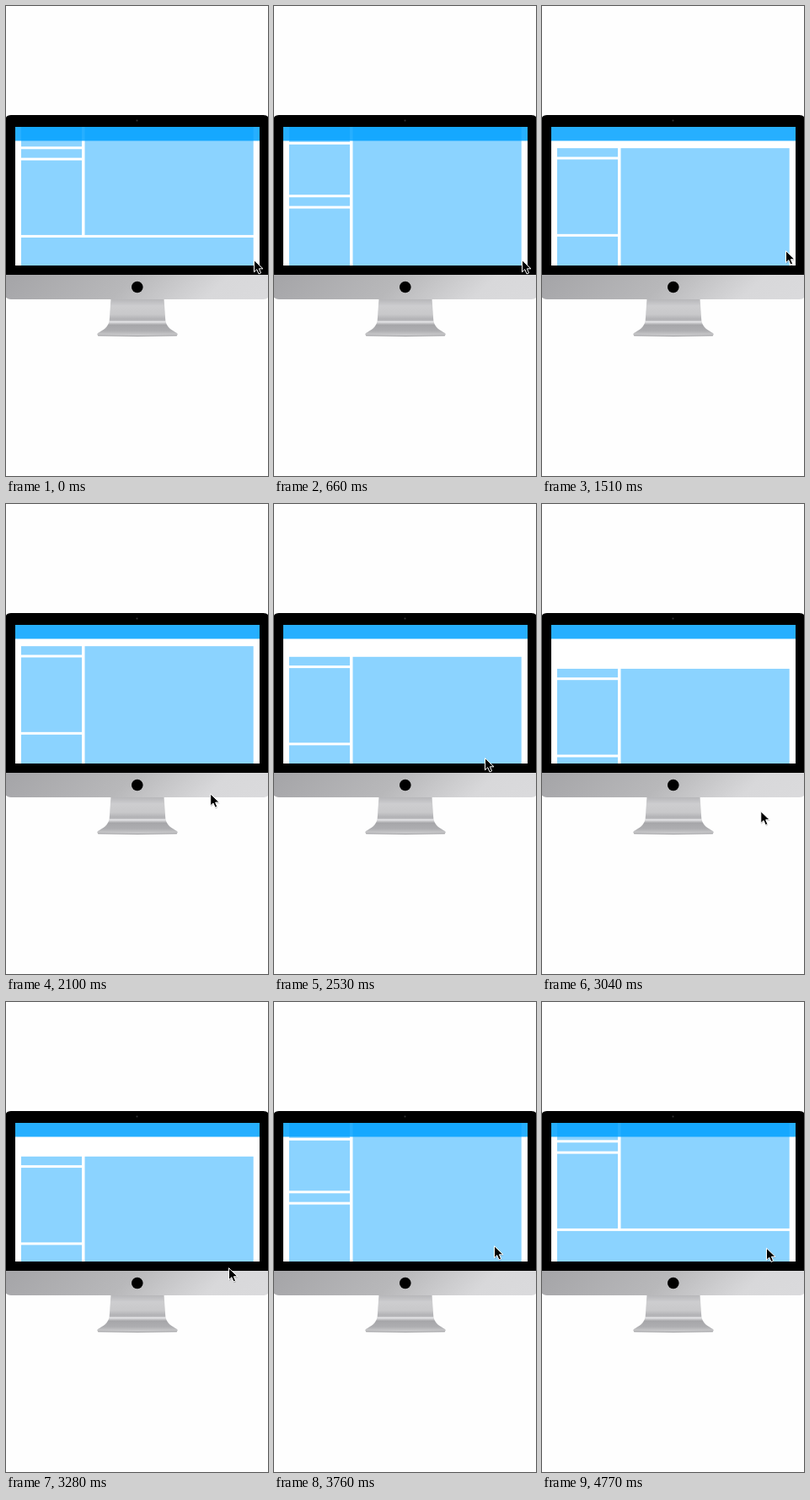
Write an HTML page that moves like this. It is 311 px wide and 556 px high and loops after 4870 ms.

```html
<!DOCTYPE html>
<html lang="en">
<head>
<meta charset="utf-8">
<title>Scrolling page</title>
<style>
  html, body { margin: 0; width: 100%; height: 100%; overflow: hidden; background: #fefefe; }
  svg { display: block; width: 100%; height: 100%; }
</style>
</head>
<body>
<svg viewBox="0 0 311 556">
  <defs>
    <linearGradient id="chin" x1="0" y1=".45" x2="1" y2=".55">
      <stop offset="0" stop-color="#a6a6a9"/>
      <stop offset=".45" stop-color="#b8b8ba"/>
      <stop offset=".8" stop-color="#d8d8da"/>
      <stop offset="1" stop-color="#dadadc"/>
    </linearGradient>
    <linearGradient id="neck" x1="0" y1="0" x2="0" y2="1">
      <stop offset="0" stop-color="#b4b4b7"/>
      <stop offset=".3" stop-color="#cdcdcf"/>
      <stop offset=".65" stop-color="#c8c8ca"/>
      <stop offset=".86" stop-color="#b0b0b3"/>
      <stop offset="1" stop-color="#e6e6e8"/>
    </linearGradient>
    <linearGradient id="foot" x1="0" y1="0" x2="0" y2="1">
      <stop offset="0" stop-color="#ececee"/>
      <stop offset=".25" stop-color="#a6a6a9"/>
      <stop offset=".65" stop-color="#aeaeb1"/>
      <stop offset="1" stop-color="#cfcfd1"/>
    </linearGradient>
    <clipPath id="screen"><rect x="11" y="143" width="290" height="164"/></clipPath>
  </defs>

  <path d="M124.5 346H187.5L189.5 375H122.5Z" fill="url(#neck)"/>
  <path d="M122.5 373H189.5C191 380 196 383 203 387Q205 389 202 390.300H110Q107 389 109 387C116 383 121 380 122.500 373Z" fill="url(#foot)"/>
  <path d="M109 389.800Q156 391.200 203 389.800" fill="none" stroke="#98989a" stroke-width=".9"/>

  <path d="M-1 318V136Q-1 129 6 129H305.500Q312.500 129 312.500 136V318Z" fill="#000"/>
  <path d="M-1 318H312.500V340Q312.500 347 305.500 347H6Q-1 347 -1 340Z" fill="url(#chin)"/>
  <circle cx="155.500" cy="135.500" r="1" fill="#343438"/>
  <circle cx="155.800" cy="332.500" r="6.800" fill="#000"/>

  <g clip-path="url(#screen)">
    <rect x="11" y="143" width="290" height="164" fill="#fff"/>
    <g id="page" fill="#8bd3ff"></g>
    <rect x="11" y="143" width="290" height="16.500" fill="#00a2ff" fill-opacity=".85"/>
  </g>

  <g id="cursor">
    <path d="M1 2V16L4.300 13L6.500 18.200L9 17.200L6.800 12.200H11.600Z" fill="#000" opacity=".22"/>
    <path d="M.5 .7V14.700L3.800 11.700L6 16.900L8.600 15.800L6.400 10.800H11Z"
      fill="#000" stroke="#fff" stroke-width="1" stroke-linejoin="round"/>
  </g>
</svg>
<script>
const LOOP = 4870, TOP = 168.2, GAP = 3;
const page = document.getElementById('page');
const cursor = document.getElementById('cursor');

function addBlock(x, y, width, height) {
  const block = document.createElementNS('http://www.w3.org/2000/svg', 'rect');
  Object.entries({ x, y, width, height }).forEach(([k, v]) => block.setAttribute(k, v));
  page.append(block);
}

// Stacked sidebar, main column of the same height, footer
const SMALL = 10.3, LARGE = 88.3, MIDDLE = 59.5;
let bottom = TOP;
for (const height of [SMALL, LARGE, MIDDLE, SMALL, LARGE]) {
  addBlock(18, bottom, 72, height);
  bottom += height + GAP;
}
addBlock(93.5, TOP, 200.2, bottom - GAP - TOP);
addBlock(18, bottom, 275.7, 120);

const easeOut = u => 1 - (1 - u) ** 2;
const smooth = u => u * u * (3 - 2 * u);

// Each leg glides to its place between begin and end, then rests there
const scrollLegs = [
  { begin: 440, end: 660, to: [109] },
  { begin: 830, end: 970, to: [0] },
  { begin: 3430, end: 3760, to: [109] },
  { begin: 4110, end: 4140, to: [169] }
];
const cursorLegs = [
  { begin: 830, end: 970, to: [289, 305] },
  { begin: 1500, end: 1510, to: [289, 289] },
  { begin: 1510, end: 1700, to: [259, 234] },
  { begin: 1840, end: 2150, to: [241, 350] },
  { begin: 2170, end: 2350, to: [250, 300] },
  { begin: 2560, end: 2920, to: [258, 376] },
  { begin: 2940, end: 3280, to: [264, 314] },
  { begin: 3280, end: 3420, to: [261, 288] },
  { begin: 4730, end: 4770, to: [266, 290.5] }
];

function follow(place, legs, ease, time) {
  for (const { begin, end, to } of legs) {
    if (time <= begin) break;
    const part = ease(Math.min(1, (time - begin) / (end - begin)));
    place = place.map((v, i) => v + (to[i] - v) * part);
  }
  return place;
}

// Elastic overscroll at the top of the page
function pull(time) {
  const u = (time - 2370) / 1100;
  return u > 0 && u < 1 ? 28.4 * Math.sin(Math.PI * u) : 0;
}

function draw(time) {
  const [scroll] = follow([166], scrollLegs, easeOut, time);
  const [x, y] = follow([294, 300], cursorLegs, smooth, time);
  page.setAttribute('transform', `translate(0 ${pull(time) - scroll})`);
  cursor.setAttribute('transform', `translate(${x} ${y})`);
}

const start = performance.now();
function tick() {
  draw((performance.now() - start) % LOOP);
  requestAnimationFrame(tick);
}
tick();
</script>
</body>
</html>
```
